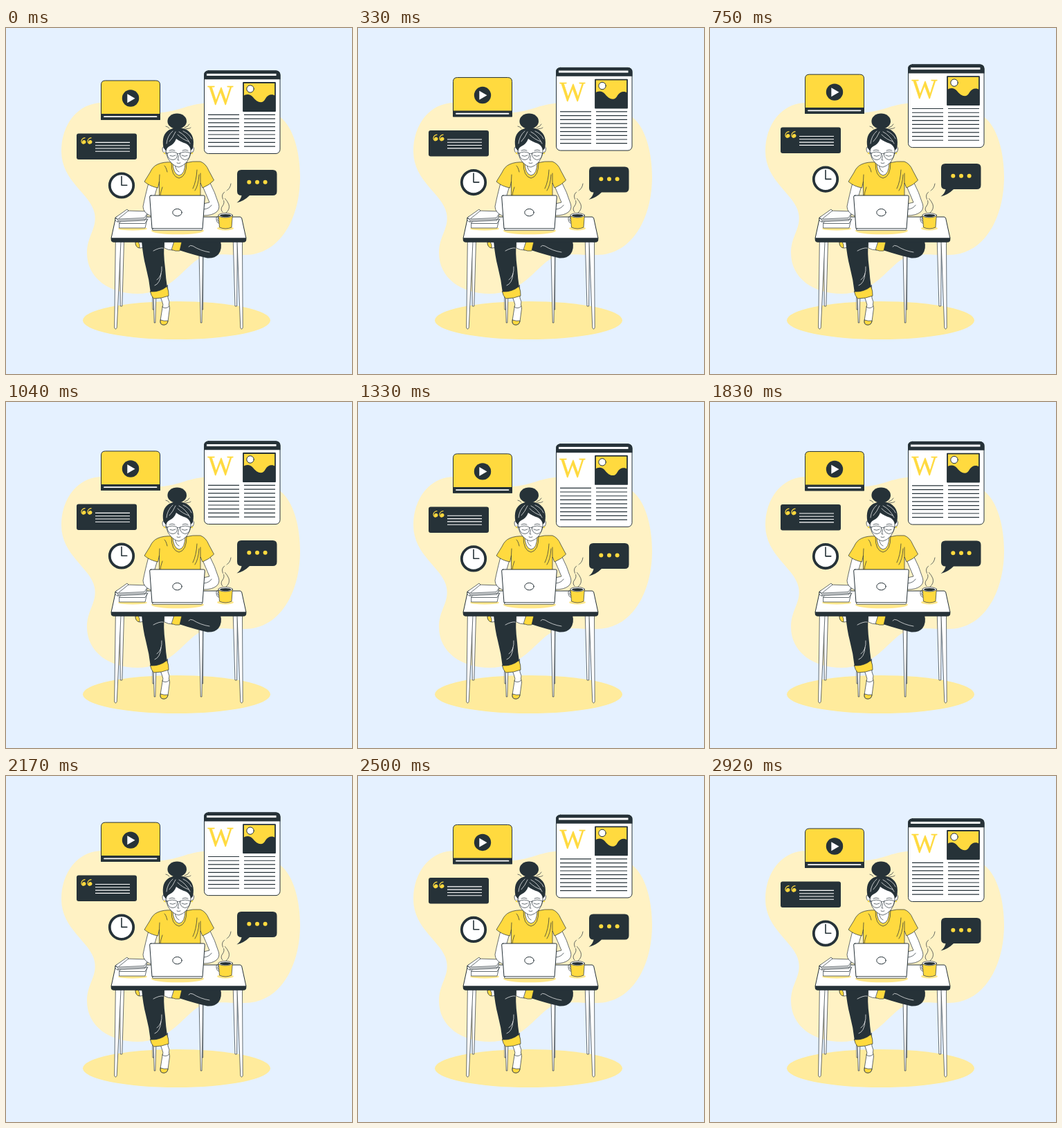
An HTML page for the animation above (2.96 s loop, 500x500 px).

```html
<!DOCTYPE html>
<html lang="en">
<head>
<meta charset="utf-8">
<title>Working at a desk</title>
<style>
  html, body { margin: 0; width: 100%; height: 100%; overflow: hidden; background: #e5f1ff; }
  svg { display: block; width: 100vw; height: 100vh; }
  .ink { fill: #263238; }
  .sun { fill: #ffda3f; }
  .white { fill: #fff; }
  .line { stroke: #263238; stroke-width: 1; stroke-linejoin: round; stroke-linecap: round; }
  .bare { fill: none; }
  .thin { stroke-width: .7; }
  .light { fill: none; stroke: #fff; stroke-width: .7; stroke-linecap: round; }
  .mark { font: 39px "Liberation Serif", "Noto Serif", serif; stroke: #ffda3f; stroke-width: .4; }
</style>
</head>
<body>
<svg viewBox="0 0 500 500">
  <rect width="500" height="500" fill="#e5f1ff"/>
  <path fill="#fff2c4" d="M80 178C80 140 103 108 140 108C175 108 192 123 224 122C250 121 264 108 300 108C332 107 376 108 400 132C418 150 425 185 425 215C425 275 396 328 345 328C320 329 292 322 272 338C250 356 232 384 190 384C150 384 117 362 117 325C117 300 132 290 128 268C123 240 80 222 80 178Z"/>
  <ellipse cx="246.5" cy="422.5" rx="135.5" ry="27.5" fill="#ffeb9c"/>

  <g id="float">
    <!-- video player -->
    <path class="sun line" d="M137.5 132V82Q137.5 76 143.500 76H216.500Q222.500 76 222.500 82V132Z"/>
    <path class="ink" d="M137 124H223V132.700H137Z"/>
    <path class="light" style="stroke-width:1.8" d="M142 128.200H217.500"/>
    <circle class="ink" cx="180" cy="101.500" r="12.200"/>
    <path class="white" d="M175.300 95.200L186.500 101.700L175.300 108.200Z"/>

    <!-- article page -->
    <rect class="white line" x="286.500" y="61.800" width="109.500" height="119.700" rx="6"/>
    <path class="ink" d="M286 74.300V68Q286 61.500 292.500 61.500H390Q396.500 61.500 396.500 68V74.300Z"/>
    <rect class="white" x="290" y="66" width="100.500" height="3"/>
    <text class="mark sun" x="291.500" y="109.500">W</text>
    <rect class="sun" x="343" y="79" width="46" height="41"/>
    <circle class="white line" cx="353" cy="88" r="5.200"/>
    <path class="ink" d="M343 98C347 95 353 95 357 100C362 107 371 111 375 102C378 96 385 95 389 98V120H343Z"/>
    <rect class="bare line" style="stroke-width:1.8" x="343" y="79" width="46" height="41"/>
    <path id="columns" class="bare line" style="stroke-width:1.200;stroke-linecap:butt"/>

    <!-- quotation -->
    <rect class="ink" x="102" y="152.500" width="87" height="37.500" rx="3"/>
    <g id="quote" fill="none" stroke="#ffda3f">
      <circle class="sun" cx="112.800" cy="164.700" r="2.300"/>
      <path stroke-width="1.200" d="M112.500 167.400C107.500 167 107.500 159.500 114.500 158.600"/>
    </g>
    <use href="#quote" x="9"/>
    <path class="light" style="stroke-width:1.100;stroke-linecap:butt" d="M129 165.400H179M129 169.700H179M129 174H179M129 178.300H179"/>

    <!-- clock -->
    <circle class="white" cx="167" cy="227.500" r="17.200" stroke="#263238" stroke-width="3.800"/>
    <path class="bare line" style="stroke-width:1.600" d="M167 214.500V227.300H174.800"/>

    <!-- chat bubble -->
    <path class="ink" d="M340 205H385.500Q391.500 205 391.500 211V236Q391.500 242 385.500 242H352Q344 250 333.500 252.500Q339.500 248 340.500 242Q334 242 334 236V211Q334 205 340 205Z"/>
    <g class="sun"><circle cx="351.300" cy="222.700" r="3"/><circle cx="363" cy="222.700" r="3"/><circle cx="374.600" cy="222.700" r="3"/></g>
  </g>

  <!-- chair and far table legs -->
  <g class="white line thin">
    <path d="M211.500 375L212 407H213.500V375Z"/>
    <path d="M213 380L214.200 426H215.800L217 380Z"/>
    <path d="M283 325L283.300 407H284.700L285 325Z"/>
    <path d="M279 325L281.300 426H283L284.500 325Z"/>
    <path d="M164.500 309L165.300 402H167.800L170.500 309Z"/>
    <path d="M328.300 309L331 402H333.600L334.300 309Z"/>
  </g>

  <!-- legs -->
  <path class="white line thin" d="M187 310Q187 317 194 318Q204 317 214 310Z"/>
  <path class="sun line thin" d="M187 310Q187 317 193 318Q194 313 191 309Z"/>
  <path class="white line thin" d="M229 309L243 309L241 321Q234 321 229 318Z"/>
  <path class="ink" d="M252 308H310Q313 319 307 327Q302 333 291 332.500Q275 329 250 321Z"/>
  <path class="light" d="M264 316Q266 313 270 315Q281 322 294 324"/>
  <path class="sun line thin" d="M243 309H254L251 322Q245 323 239.500 320.500Z"/>
  <path class="white line thin" d="M223 388L225.500 395Q228 400 226 404L223 423Q222 429 228 429Q233 429 234 424L236.500 405L235.500 400Q237 396 234 390L233.500 372Z"/>
  <path class="bare line thin" d="M225.700 403Q231 407 236 402"/>
  <path class="sun line thin" d="M223.300 422Q229 424 234 423Q233 429 228 429Q222 429 223.300 422Z"/>
  <path class="ink" d="M196 308H229Q227 325 230 347Q231 362 233 375Q223 382 209 383Q207 364 202 345Q198 330 196 308Z"/>
  <path class="light" d="M213 322Q222 317 227 318M225 345Q226 358 218 364M224 355Q223 369 215 372"/>
  <path class="sun line thin" d="M208.500 381Q222 382 232.500 373.500Q235.500 380 235 387Q225 391 213.500 391Q209.500 387 208.500 381Z"/>

  <!-- near table legs and top -->
  <g class="white line thin">
    <path d="M158.300 309L156.700 433Q158.400 437 160.200 433L166 309Z"/>
    <path d="M334 309L338.800 433Q340.500 437 342.200 433L341.500 309Z"/>
  </g>
  <path class="white line" d="M160 273H338Q340 273 340.700 275L347 304H152L158.300 275Q159 273 160 273Z"/>
  <path class="ink" d="M151.700 303.500H347.300V306Q347 309.800 343 309.800H156Q152 309.800 151.700 306Z"/>
  <ellipse fill="#ffe78a" cx="248" cy="293" rx="38" ry="5.300"/>
  <ellipse fill="#ffe78a" cx="317" cy="289.500" rx="12" ry="3"/>
  <ellipse fill="#ffe78a" cx="183" cy="290" rx="21" ry="2.500"/>

  <!-- books -->
  <g class="white line thin">
    <path d="M164 281L171 276H204L201 289H164Z"/>
    <path d="M164 282.500H201L205 276" fill="none"/>
    <path d="M158 275L174 264L206 265L201 278L161 280Q157 279 158 275Z"/>
    <path d="M158 275Q163 276 162 280M163 276L200 274.500L206 265M163 278L201 276.500" fill="none"/>
    <path d="M158 274L175 262L177 264L162 276Z"/>
  </g>

  <!-- arms -->
  <g class="white line thin">
    <path d="M206 224Q201 243 198 258Q198 267 210 272L212 252L219 228Z"/>
    <path d="M283 226Q289 240 294 252L285 254V271Q298 271 304 266Q309 262 307.500 255Q302 237 294 222Z"/>
    <path d="M286 262Q294 261 297 256" fill="none"/>
  </g>

  <!-- shirt and neck -->
  <path class="sun line thin" d="M240 194Q228 193 219 197Q212 200 208 209L200 222Q208 229 219.500 231L221.500 222V246H281V224L284 231Q294 227 300.500 220L293 206Q289 196 281 193Q270 192 259 195Z"/>
  <path class="bare line thin" d="M222 212L221.500 222M281 210V224M226 230Q223 238 223 242M276 205Q275 222 270 232M279 212Q278 228 273 235M233 208Q231 200 229 199"/>
  <path class="white line thin" d="M241 193Q241 211 250 213Q259 212 259 193Z"/>
  <path class="bare line thin" d="M239 195Q239 215 250 217Q261 215 261 194"/>
  <path class="bare line thin" d="M244 198Q246 207 250 208"/>

  <!-- head -->
  <ellipse class="ink" cx="247.200" cy="134.700" rx="13.800" ry="11.200"/>
  <path class="bare line thin" d="M236 145Q233 142 231 142M258 144Q263 143 265 139M256 146Q265 146 267 144"/>
  <path class="white line thin" d="M232 174Q226 169 226 175Q226 181 232 182ZM266 174Q272 169 271.500 175Q271 181 266 182Z"/>
  <circle class="sun" cx="229" cy="181" r="1.200"/>
  <circle class="sun" cx="269" cy="181" r="1.200"/>
  <path class="white line thin" d="M231 164Q229 185 238 194Q245 201 250 201Q255 200 261 194Q269 184 267 164L248 155Z"/>
  <path class="ink" d="M227.500 173Q224 154 236 147Q248 141 261 147Q274 155 270 174L267 177Q266 170 260 167Q251 164 246 160Q243 168 236 171Q232 173 231.500 178Z"/>
  <path class="light" d="M241 149Q233 156 232 167M245 150Q241 159 236 164M250 150Q260 155 266 167M248 154Q255 161 264 164M256 149Q265 153 268 160"/>
  <g class="bare line thin">
    <path d="M233 181Q240 177 247.500 181Q248.500 190 241 190.500Q233 190 233 181ZM251.500 181Q259 177 266.500 181Q266 190 258.500 190.500Q251 189 251.500 181ZM247.500 182Q249.500 180.500 251.500 182M233 181L229.500 179M266.500 181L269 179"/>
    <path d="M237 184.500Q241 186.500 245 184M254 184Q258 186.500 262 184.500M236 177Q240 175 244 177M255 177Q259 175 263 177M249.500 184L248.300 191H250M247 195Q249.500 196.500 252 195"/>
  </g>

  <!-- laptop -->
  <path class="white line" d="M209.500 242H285.500Q287.500 242 287.300 244L284 290H211L207.700 244Q207.500 242 209.500 242Z"/>
  <rect class="white line thin" x="211.500" y="289.800" width="72" height="2.500" rx="1"/>
  <ellipse class="white line" cx="247.500" cy="266.600" rx="6.700" ry="5.200"/>

  <!-- cup -->
  <path class="bare line thin" d="M308 273Q303 271 304 277Q305 283 309 282M308 275Q305 274 306 278Q307 281 309 280"/>
  <path class="sun line thin" d="M307 270.500L308.500 288Q317 292 326 288L327.300 270.500Z"/>
  <ellipse class="white line thin" cx="317.200" cy="270.700" rx="10.200" ry="3.200"/>
  <ellipse class="ink" cx="317.200" cy="271.100" rx="8.200" ry="2.100"/>
  <path class="bare line thin" d="M313 266Q309 262 313 257Q317 252 313 246Q311 240 317 236Q324 233 325 225M318 267Q324 262 322 255Q320 250 316 246"/>
  <path class="bare" stroke="#fff2c4" stroke-width="1.500" d="M314 249L316 245M316 237L319 234"/>
</svg>
<script>
  const FPS = 24, LOOP = 2960, PERIOD = 36, RISE = 10;
  const layer = document.getElementById("float");

  const rows = Array.from({ length: 9 }, (_, i) => 125.4 + i * 5.72);
  document.getElementById("columns").setAttribute("d",
    rows.map(y => `M292 ${y}H337M344 ${y}H389`).join(""));

  // Linear rise and fall, stepped at the frame rate.
  const lift = step => RISE * (1 - Math.abs(2 * (step % PERIOD) / PERIOD - 1));

  function draw(now) {
    const step = Math.floor((now % LOOP) / 1000 * FPS + 0.15) + 1;
    layer.setAttribute("transform", `translate(0 ${lift(1) - lift(step)})`);
  }

  function tick() {
    draw(performance.now());
    requestAnimationFrame(tick);
  }
  tick();
</script>
</body>
</html>
```
